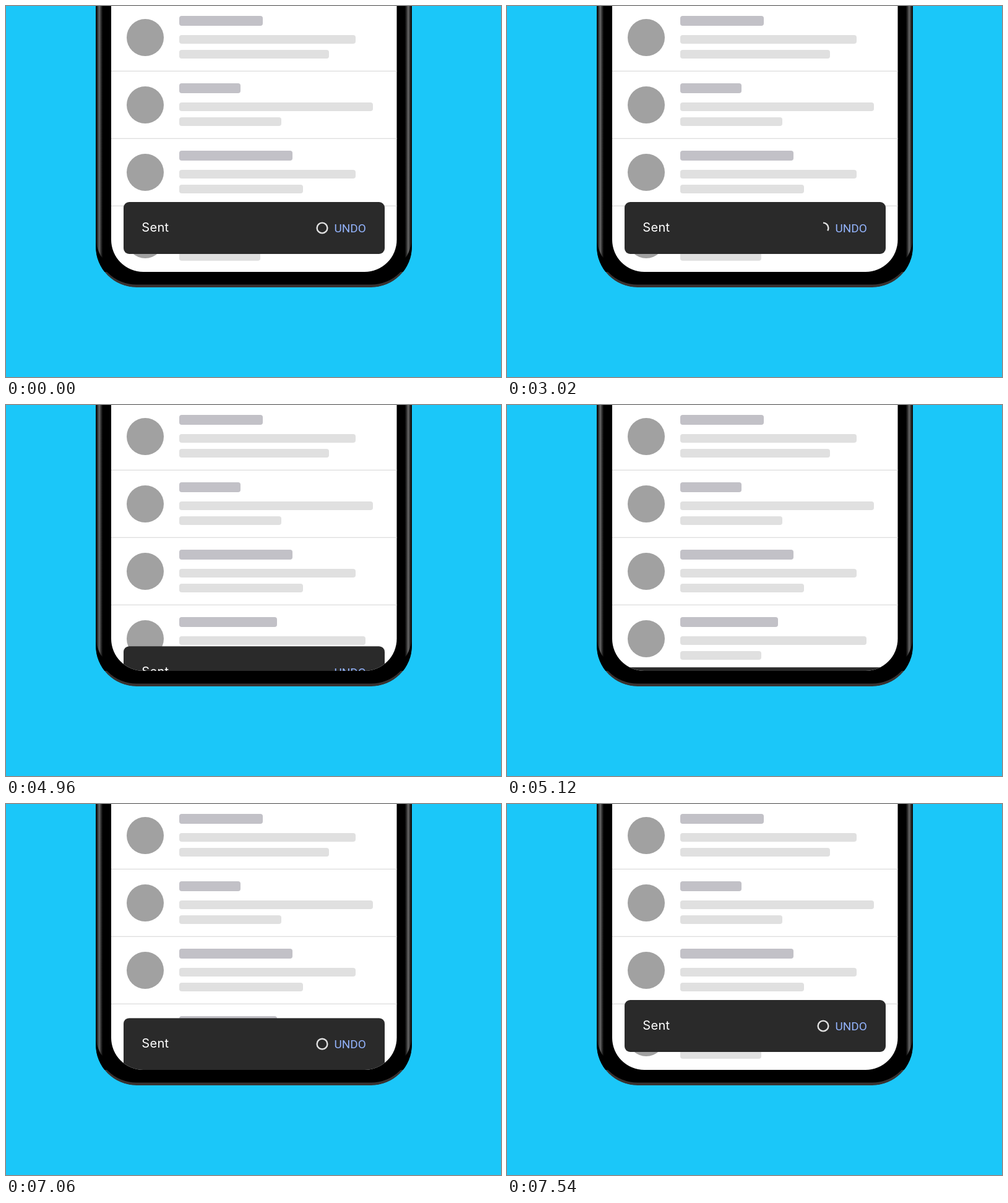
Animation, 800 px wide and 600 px high, one loop 7560 ms. Source, as an HTML page:

```html
<!DOCTYPE html>
<html lang="en">
<head>
<meta charset="utf-8">
<title>Undo toast</title>
<style>
  html, body { margin: 0; width: 100%; height: 100%; overflow: hidden; background: #1bc7f9; }
  svg { display: block; width: 800px; height: 600px; }
  .avatar { fill: #a1a1a1; }
  .name { fill: #c2c1c7; }
  .line { fill: #e0e0e0; }
  .divider { fill: #dedede; }
  .message { font: 400 20px Inter, sans-serif; letter-spacing: .3px; fill: #fff; }
  .undo { font: 400 19px Roboto, sans-serif; fill: #92b2fa; }
  .toast { animation: slide 7560ms infinite; }
  .ring {
    fill: none; stroke: #e2e2e2; stroke-width: 2.4;
    stroke-dasharray: 100 100;
    animation: countdown 7560ms linear infinite;
  }
  /* leaves at 4560 ms for 695 ms, returns at 6918 ms for 570 ms */
  @keyframes slide {
    0% { transform: translateY(0); }
    60.317% { transform: translateY(0); animation-timing-function: cubic-bezier(.42, 0, .58, 1); }
    69.511% { transform: translateY(116px); }
    91.508% { transform: translateY(116px); animation-timing-function: cubic-bezier(.333, 1.4, .667, 1); }
    99.048%, 100% { transform: translateY(0); }
  }
  @keyframes countdown {
    0% { stroke-dashoffset: 0; }
    60.317% { stroke-dashoffset: 100; visibility: visible; }
    60.318%, 80% { stroke-dashoffset: 100; visibility: hidden; }
    80.001%, 100% { stroke-dashoffset: 0; visibility: visible; }
  }
</style>
</head>
<body>
<svg viewBox="0 0 800 600">
  <defs>
    <linearGradient id="sheen">
      <stop offset="0" stop-color="#0c0c0c"/>
      <stop offset=".2" stop-color="#262626"/>
      <stop offset=".48" stop-color="#696969"/>
      <stop offset=".75" stop-color="#2b2b2b"/>
      <stop offset="1" stop-color="#000"/>
    </linearGradient>
    <clipPath id="screen">
      <path d="M170 0H631.5V378A52 52 0 0 1 579.5 430H222A52 52 0 0 1 170 378Z"/>
    </clipPath>
    <clipPath id="body">
      <path id="shell" d="M145 0H656V389A66 66 0 0 1 590 455H211A66 66 0 0 1 145 389Z"/>
    </clipPath>
    <path id="edge" d="M145.5 0H156.5V408L153 404Q148 395 145.5 382Z" fill="url(#sheen)"/>
  </defs>

  <g clip-path="url(#body)">
    <use href="#shell" fill="#383231"/>
    <use href="#shell" y="-4.5"/>
    <path d="M145 0H656V430H145Z"/>
    <use href="#edge"/>
    <use href="#edge" transform="matrix(-1 0 0 1 801 0)"/>
  </g>

  <g clip-path="url(#screen)">
    <path d="M170 0H632V430H170Z" fill="#fff"/>
    <g id="rows"></g>
    <g class="toast">
      <rect x="190" y="317" width="422" height="84" rx="9" fill="#2a2a2a"/>
      <text class="message" x="219.3" y="365">Sent</text>
      <circle class="ring" cx="511" cy="359" r="8.4" pathLength="100" transform="rotate(-90 511 359)"/>
      <text class="undo" x="530.5" y="366">UNDO</text>
    </g>
  </g>
</svg>
<script>
  // widths of the name and the two text lines in each row
  const rows = [[135, 285, 242], [99, 313, 165], [183, 285, 200], [158, 301, 131]];
  const bar = (kind, y, width, height) =>
    `<rect class="${kind}" x="280" y="${y}" width="${width}" height="${height}" rx="4"/>`;

  document.getElementById('rows').innerHTML = rows.map(([name, first, second], i) =>
    `<g transform="translate(0 ${109 * i})">
      <circle class="avatar" cx="225" cy="51" r="30"/>
      ${bar('name', 16, name, 16)}${bar('line', 47, first, 14)}${bar('line', 71, second, 14)}
      <rect class="divider" x="170" y="104.7" width="462" height="1.3"/>
    </g>`).join('');
</script>
</body>
</html>
```
